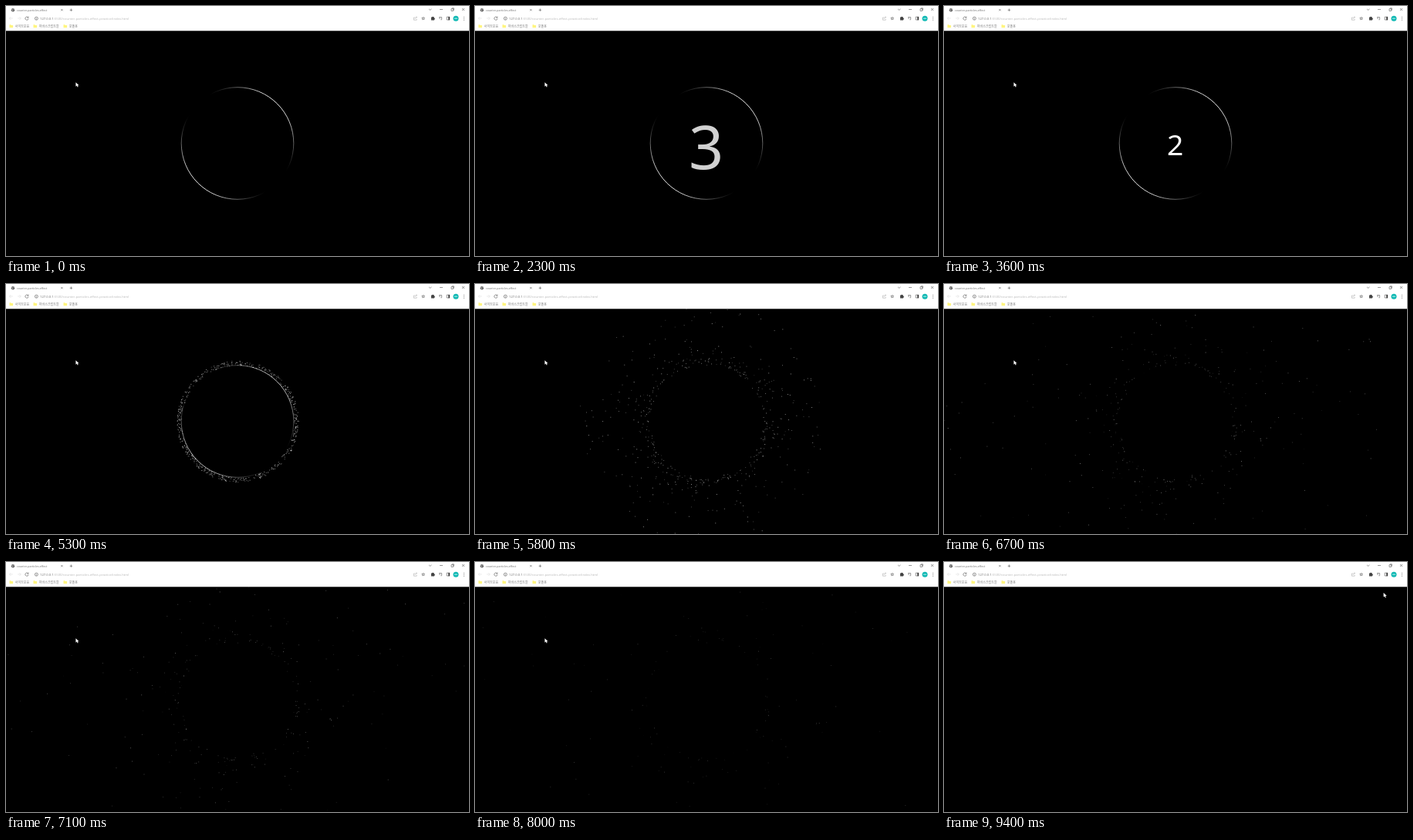
These frames come from a looping animation (600 by 325 pixels, 9800 ms). An HTML page:

```html
<!DOCTYPE html>
<html lang="ko">
<head>
<meta charset="utf-8">
<title>counter-particles-effect</title>
<style>
  html, body { margin: 0; width: 100%; height: 100%; overflow: hidden; background: #000; }
  svg { display: block; width: 600px; height: 325px; }
  text { font-family: "Noto Sans", "Open Sans", sans-serif; }
  #digit { font-stretch: semi-condensed; }
  .hangul { font: 4px "Noto Sans CJK KR", "Noto Sans CJK", sans-serif; fill: #777; }
  .icon { fill: none; stroke: #555; stroke-width: .6; }
  .faint { stroke: #ddd; }
</style>
</head>
<body>
<svg viewBox="0 0 600 325">
  <defs>
    <linearGradient id="sheen" x1="0" y1="0" x2="1" y2="1">
      <stop offset=".16" stop-color="#fff" stop-opacity="0"/>
      <stop offset=".25" stop-color="#fff" stop-opacity=".4"/>
      <stop offset=".36" stop-color="#fff" stop-opacity=".8"/>
      <stop offset=".5" stop-color="#fff"/>
      <stop offset=".64" stop-color="#fff" stop-opacity=".8"/>
      <stop offset=".75" stop-color="#fff" stop-opacity=".4"/>
      <stop offset=".84" stop-color="#fff" stop-opacity="0"/>
    </linearGradient>
  </defs>

  <rect width="600" height="325"/>
  <g id="particles" fill="#fff"></g>
  <circle id="ring" cx="300" cy="178.5" r="72.8" fill="none" stroke="url(#sheen)" stroke-width=".95"/>
  <text id="digit" y="16.4" font-size="37.3" text-anchor="middle" fill="#fff"></text>

  <g id="browser">
    <rect width="600" height="32.3" fill="#fff"/>
    <circle cx="9" cy="5.2" r="2.2" fill="#666"/>
    <path d="M7.5 4.6l1.4.6-.4 1.2M9.6 3.6l.8 1" class="icon" style="stroke:#eee"/>
    <text x="14" y="6.6" font-size="3.6" fill="#777">counter-particles-effect</text>
    <path class="icon" d="M71.3 4.1l2.2 2.2m0-2.2l-2.2 2.2M82.6 5.2h3.6m-1.8-1.8v3.6"/>
    <path class="icon" d="M548 3.8l1.7 1.6 1.7-1.6M562 4.5h4M577 3.6h2.6v2.8H577zM578 2.8h2.4v2.8M591 3l3 3m0-3l-3 3"/>

    <path class="icon faint" d="M8.8 16H4.4m2-2l-2 2 2 2M15 16h4.4m-2-2l2 2-2 2"/>
    <path class="icon" d="M28.6 14.7a2.1 2.1 0 1 0 .5 1.8M29 13.6v1.7h-1.7"/>
    <circle class="icon" cx="39.4" cy="16.2" r="2"/>
    <path class="icon" d="M39.4 15.2v.4m0 .5v1.3"/>
    <text x="44" y="17.7" font-size="4.2" fill="#bbb"><tspan fill="#777">127.0.0.1</tspan>:5500/counter-particles-effect-practice/index.html</text>

    <path class="icon" style="stroke:#aaa" d="M529.8 15h-1.4v3.2h3.8v-1.2M530 16.6q.3-1.9 2.4-1.9m-1-1.1l1.2 1.1-1.2 1"/>
    <path class="icon" d="M540.7 14.3l.6 1.2 1.3.1-1 .9.3 1.3-1.2-.7-1.2.7.3-1.3-1-.9 1.3-.1z"/>
    <path fill="#444" d="M551 14.6h1.2a.9.9 0 0 1 1.8 0h1v1.2a.9.9 0 0 1 0 1.8v1h-4z"/>
    <path class="icon" d="M561 14.6h3.4M561 16h2m1.6-1.6v3.2m-1.2.2h1.2M571.2 14.2h3.6v3.8h-3.6z"/>
    <path fill="#444" d="M573.2 14h1.8v4.2h-1.8z"/>
    <circle cx="583" cy="16.2" r="3.5" fill="#12b9b4"/>
    <path d="M581 16.2h4" stroke="#bfeeec"/>
    <path d="M593.5 13.9v5" stroke="#555" stroke-width=".8" stroke-dasharray=".8 1.2"/>

    <g id="bookmarks"></g>
  </g>
  <path id="cursor" d="M0 0v5.6l1.3-1.2 1 2 1-.5-1-1.9h1.9z" fill="#fff"/>
</svg>
<script>
const LOOP = 9800, STEP = 100, BURST = 5300;
const CENTER = { x: 300, y: 178.5 };
const $ = id => document.getElementById(id);
const clamp = v => Math.min(1, Math.max(0, v));
const smooth = v => v * v * (3 - 2 * v);

function add(parent, tag, attrs, text = "") {
  const el = document.createElementNS("http://www.w3.org/2000/svg", tag);
  for (const key in attrs) el.setAttribute(key, attrs[key]);
  el.textContent = text;
  return parent.appendChild(el);
}

let seed = 20417;
function random() {
  seed = (seed * 1664525 + 1013904223) % 4294967296;
  return seed / 4294967296;
}

for (const [x, label] of [[4.5, "사이트모음"], [35.5, "자바스크립트들"], [74.5, "포폴용"]]) {
  add($("bookmarks"), "path", { d: `M${x} 24.3h1.8l.6.6h2.2v3.4h-4.6z`, fill: "#fff57f" });
  add($("bookmarks"), "text", { x: x + 7.3, y: 27.7, class: "hangul" }, label);
}

const particles = Array.from({ length: 520 }, () => ({
  angle: random() * Math.PI * 2,
  start: 73 + random() * 6,
  speed: 175 * random() ** 3.1,
  drift: (random() - .5) * 16,
  life: .8 + 3.1 * random(),
  glow: .3 + .45 * random(),
  el: add($("particles"), "rect", {})
}));

function drawParticles(t) {
  const age = (t - BURST) / 1000;
  const active = age >= 0 && t < 9300;
  $("particles").style.display = active ? "" : "none";
  if (!active) return;
  for (const p of particles) {
    const left = clamp(1 - age / p.life);
    const radius = p.start + p.speed * age;
    const size = left && .65 + .3 * left;
    const x = CENTER.x + Math.cos(p.angle) * radius - Math.sin(p.angle) * p.drift * age;
    const y = CENTER.y + Math.sin(p.angle) * radius + Math.cos(p.angle) * p.drift * age;
    p.el.setAttribute("x", x.toFixed(2));
    p.el.setAttribute("y", y.toFixed(2));
    p.el.setAttribute("width", size);
    p.el.setAttribute("height", size);
    p.el.setAttribute("opacity", p.glow * left ** .5);
  }
}

const counts = [
  { text: "3", at: 2300, zoom: 2.12, alpha: .82 },
  { text: "2", at: 3300, zoom: 2.35, alpha: .72 },
  { text: "1", at: 4300, zoom: 2.08, alpha: .84 }
];

function drawDigit(t) {
  const count = counts.find(c => t >= c.at && t < c.at + 1000);
  $("digit").textContent = count ? count.text : "";
  if (!count) return;
  const remaining = (1 - clamp((t - count.at) / 300)) ** 2;
  const scale = 1 + (count.zoom - 1) * remaining;
  $("digit").setAttribute("transform", `translate(299.6 177.4) scale(${scale})`);
  $("digit").setAttribute("opacity", 1 - (1 - count.alpha) * remaining);
}

function drawCursor(t) {
  const travel = smooth(clamp((t - 8300) / 900));
  const creep = clamp((t - 9200) / 200);
  const x = 90.4 + 479.2 * travel;
  const y = 99.2 - 56.8 * travel - 2.4 * creep;
  $("cursor").setAttribute("transform", `translate(${x} ${y})`);
}

function draw(t) {
  drawParticles(t);
  drawDigit(t);
  drawCursor(t);
  $("ring").setAttribute("opacity", t < BURST ? 1 : .8 * clamp(1 - (t - BURST) / 400));
}

const began = performance.now();
let shown = -1;
function tick() {
  const elapsed = (performance.now() - began) % LOOP;
  const t = Math.floor(elapsed / STEP) * STEP;
  if (t !== shown) draw(shown = t);
  requestAnimationFrame(tick);
}
tick();
</script>
</body>
</html>
```
